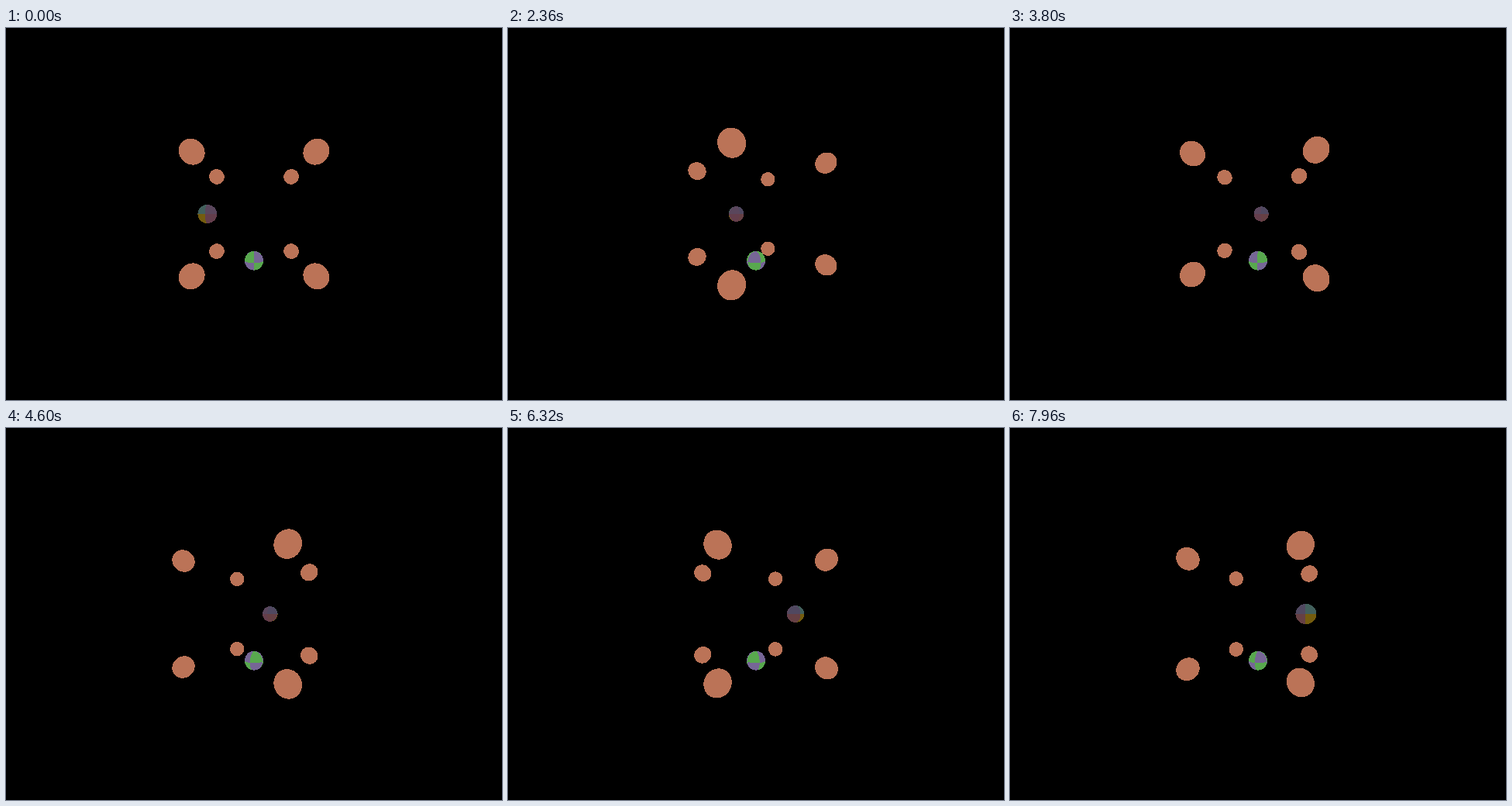
These frames come from a looping animation (640 px wide and 480 px high, 8000 ms). An HTML page with a canvas:

```html
<!DOCTYPE html>
<html lang="en">
<head>
<meta charset="utf-8">
<title>Orbiting spheres</title>
<style>
html, body { margin: 0; width: 100%; height: 100%; overflow: hidden; background: #000; }
canvas { display: block; width: 100vw; height: 100vh; }
</style>
</head>
<body>
<canvas id="stage" width="640" height="480"></canvas>
<script>
const W = 640, H = 480, FOCAL = 240, CAM = 4, RADIUS = 0.2;
const STEP = 40, STEPS = 200;

const ctx = document.getElementById('stage').getContext('2d');
const image = ctx.createImageData(W, H);
const pixels = new Uint32Array(image.data.buffer);
const rgb = (r, g, b) => (255 << 24 | b << 16 | g << 8 | r) >>> 0;

const BLACK = rgb(0, 0, 0);
const CLAY = rgb(187, 115, 87);
const GREEN = rgb(88, 168, 78), VIOLET = rgb(118, 102, 150);
const TEAL = rgb(66, 96, 92), OLIVE = rgb(116, 92, 14);
const PLUM = rgb(90, 70, 92), WINE = rgb(100, 62, 76);
const SLATE = rgb(80, 72, 96), RUST = rgb(102, 64, 68);

// Each paint picks a colour from the surface normal in the sphere's own frame.
const clay = () => CLAY;
const checker = (x, y, z) => x * y * z > 0 ? VIOLET : GREEN;
const octants = (x, y, z) => {
  if (x < 0) return y > 0 ? TEAL : OLIVE;
  if (z < 0) return y > 0 ? SLATE : RUST;
  return y > 0 ? PLUM : WINE;
};

const spheres = [
  { x: -1, y: 0, z: 0, paint: octants },
  { x: 0, y: -1, z: 0, paint: checker }
];
for (const x of [-1, 1])
  for (const y of [-1, 1])
    for (const z of [-1, 1]) spheres.push({ x, y, z, paint: clay });

function drawSphere({ x, y, z, paint }, cos, sin) {
  const depth = CAM - z;
  const cx = W / 2 + FOCAL * x / depth;
  const cy = H / 2 - FOCAL * y / depth;
  const reach = 1.3 * FOCAL * RADIUS / depth + 2;
  const c = x * x + y * y + depth * depth - RADIUS * RADIUS;

  for (let py = Math.floor(cy - reach); py < cy + reach; py++) {
    const v = (H / 2 - py - 0.5) / FOCAL;
    for (let px = Math.floor(cx - reach); px < cx + reach; px++) {
      const u = (px + 0.5 - W / 2) / FOCAL;
      const a = u * u + v * v + 1;
      const b = u * x + v * y + depth;
      const disc = b * b - a * c;
      if (disc < 0) continue;
      const t = (b - Math.sqrt(disc)) / a;
      const nx = u * t - x, ny = v * t - y, nz = depth - t;
      pixels[py * W + px] = paint(nx * cos + nz * sin, ny, nz * cos - nx * sin);
    }
  }
}

function draw(ms) {
  const angle = Math.floor(ms / STEP) % STEPS * Math.PI / 180;
  const cos = Math.cos(angle), sin = Math.sin(angle);
  pixels.fill(BLACK);
  spheres
    .map(s => ({ ...s, x: s.x * cos - s.z * sin, z: s.x * sin + s.z * cos }))
    .sort((p, q) => p.z - q.z)
    .forEach(s => drawSphere(s, cos, sin));
  ctx.putImageData(image, 0, 0);
}

let start;
function tick(now) {
  start ??= now;
  draw(now - start);
  requestAnimationFrame(tick);
}
draw(0);
requestAnimationFrame(tick);
</script>
</body>
</html>
```
